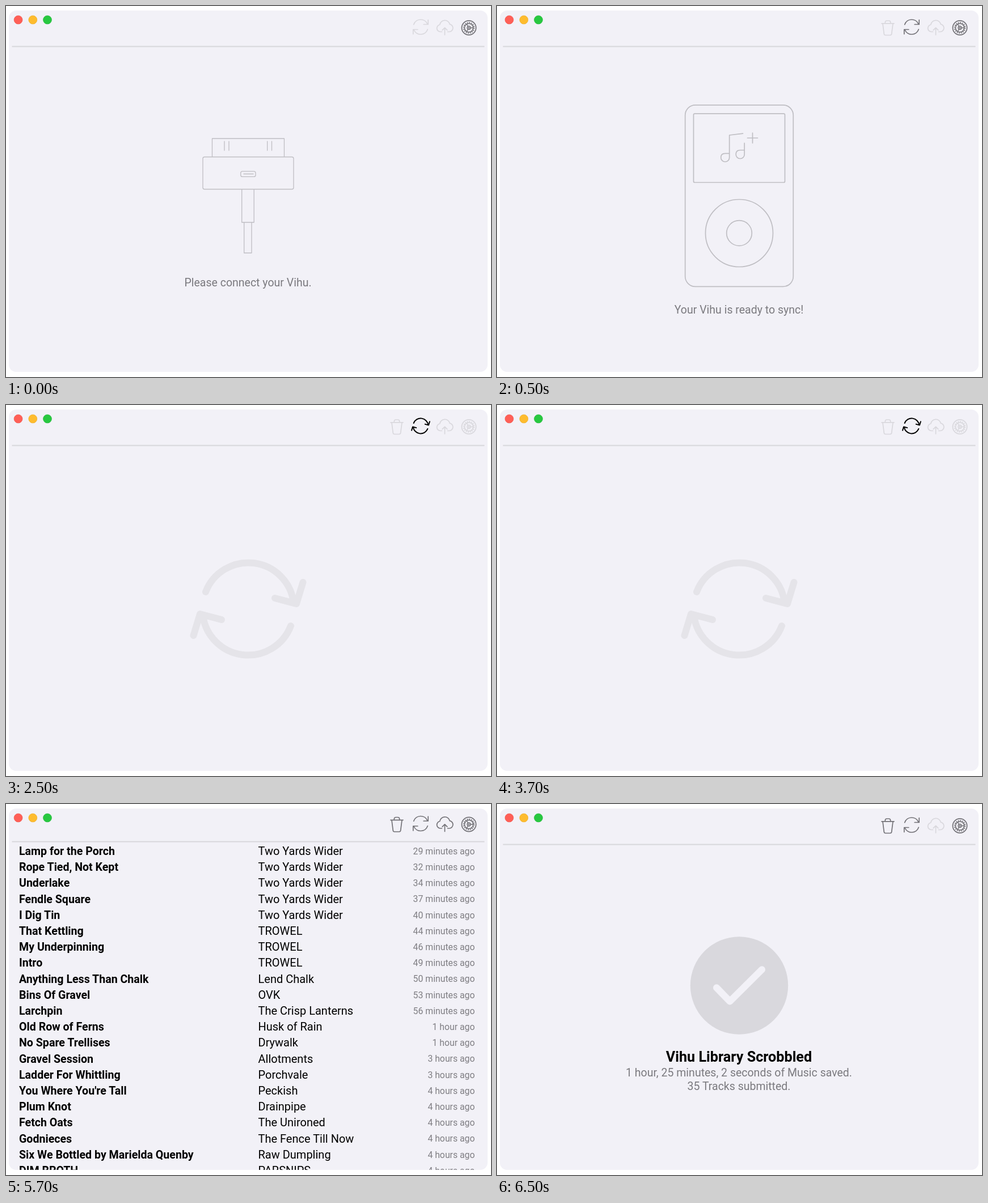
An HTML page that plays this animation: 855 px wide and 655 px high, repeating every 8000 ms.

```html
<!DOCTYPE html>
<html lang="en">
<head>
<meta charset="utf-8">
<title>Library sync</title>
<style>
  html, body { margin: 0; width: 100%; height: 100%; overflow: hidden; background: #fff; }
  svg { display: block; width: 855px; height: 655px; font-family: Roboto, Inter, sans-serif; }
  .line { fill: none; stroke: #bfbec3; stroke-linejoin: round; stroke-linecap: round; }
  .icon { fill: none; stroke-width: 1.7; stroke-linecap: round; stroke-linejoin: round; }
  .mid { text-anchor: middle; }
  .end { text-anchor: end; font-size: 15.8px; fill: #7f7e83; }
  .note { font-size: 19.5px; fill: #7b7a7f; }
  .bold { font-weight: 700; }
</style>
</head>
<body>
<svg viewBox="0 0 855 655">
  <defs>
    <clipPath id="frame"><rect x="5" y="8" width="844" height="638" rx="13"/></clipPath>
    <g id="arrows">
      <path id="arrow" d="M-75-30A80.5 80.5 0 0 1 80-11M47-19L85-9L96.5-47"/>
      <use href="#arrow" transform="rotate(180)"/>
    </g>
  </defs>
  <rect x="5" y="8" width="844" height="638" rx="13" fill="#f2f1f7"/>
  <g stroke-width=".8">
    <circle cx="21.6" cy="24.4" r="7.4" fill="#ff5f57" stroke="#f0584f"/>
    <circle cx="47.3" cy="24.4" r="7.4" fill="#febc2e" stroke="#efb02b"/>
    <circle cx="73" cy="24.4" r="7.4" fill="#28c840" stroke="#24ba3a"/>
  </g>
  <path id="rule" stroke="#d8d7dc" stroke-width="1.8"/>

  <g id="bar" class="icon">
    <path id="trash" d="M678 30.8H700M684.3 30.5V29Q684.3 26 687.3 26H690.7Q693.7 26 693.7 29V30.5M680 31L682.3 49.2Q682.6 51.5 684.9 51.5H693.1Q695.4 51.5 695.7 49.2L698 31"/>
    <g id="sync" transform="translate(731 37)">
      <path id="turn" d="M-12.3-4.2A13 13 0 0 1 12-5M13.2-12.5V-4.5H5.2"/>
      <use href="#turn" transform="rotate(180)"/>
    </g>
    <g id="busy" transform="translate(731 37) scale(.165)"><use href="#arrows" stroke-width="12"/></g>
    <path id="cloud" d="M768.5 45.5H766A6.3 6.3 0 0 1 764.8 33A8.9 8.9 0 0 1 782.3 32.2A6.7 6.7 0 0 1 781.5 45.5H778.5M773.5 51V38.5M769.2 42.6L773.5 38.3L777.8 42.6"/>
    <g id="gear" transform="translate(816 38.5)">
      <circle r="12.6"/>
      <circle r="9.2" stroke-width="2" stroke-dasharray="1.8 1.81" stroke-linecap="butt"/>
      <circle r="7.6" stroke-width="1.5"/>
      <circle r="2.9" stroke-width="1.5"/>
      <path stroke-width="1.4" d="M3 0H7.5M-1.5-2.6L-3.7-6.5M-1.5 2.6L-3.7 6.5"/>
      <circle r=".6"/>
    </g>
  </g>

  <g class="scene">
    <g class="line" stroke-width="1.3">
      <path d="M363.5 266V234H490.5V266M385 239V255M393 239V255M460.7 239V255M468.5 239V255M419 296.5H436M415.7 324V382H437.2V324M419.7 382V436H433V382"/>
      <rect x="347" y="266.5" width="160" height="57" rx="3"/>
      <rect x="413.8" y="291.8" width="26.2" height="9.6" rx="3"/>
    </g>
    <text class="note mid" x="426.5" y="495">Please connect your Vihu.</text>
  </g>

  <g class="scene">
    <g class="line" stroke-width="1.7">
      <rect x="331.7" y="174.8" width="190.6" height="320.5" rx="18"/>
      <rect x="346.5" y="190.2" width="161" height="121.3" rx="2"/>
      <circle cx="427" cy="401" r="59.5"/>
      <circle cx="427" cy="401" r="22.3"/>
      <path d="M409.7 260.3H402Q394.7 260.3 394.7 267.5A7.5 7.5 0 0 0 409.7 267.5V228L433.5 225.2M436.2 242V262A7.5 7.5 0 0 1 421.2 262Q421.2 254.5 428.5 254.5H436.2M441.5 233H459.5M450.5 224V242"/>
    </g>
    <text class="note mid" x="426.5" y="542.5">Your Vihu is ready to sync!</text>
  </g>

  <g class="scene">
    <use href="#arrows" class="icon" transform="translate(427 360)" stroke="#e5e4e9" style="stroke-width:12"/>
  </g>

  <g class="scene" id="list" clip-path="url(#frame)"></g>

  <g class="scene">
    <circle cx="427" cy="320.5" r="86.2" fill="#d9d8dd"/>
    <path class="icon" d="M387 324.3L410.5 348.5L467 292.3" stroke="#f2f1f7" style="stroke-width:12"/>
    <text class="mid bold" x="426.5" y="455" font-size="25.2">Vihu Library Scrobbled</text>
    <text class="note mid" x="426.5" y="481">1 hour, 25 minutes, 2 seconds of Music saved.</text>
    <text class="note mid" x="426.5" y="505">35 Tracks submitted.</text>
  </g>
</svg>
<script>
const $ = id => document.getElementById(id);

const tracks = `Lamp for the Porch|Two Yards Wider|29 minutes
Rope Tied, Not Kept|Two Yards Wider|32 minutes
Underlake|Two Yards Wider|34 minutes
Fendle Square|Two Yards Wider|37 minutes
I Dig Tin|Two Yards Wider|40 minutes
That Kettling|TROWEL|44 minutes
My Underpinning|TROWEL|46 minutes
Intro|TROWEL|49 minutes
Anything Less Than Chalk|Lend Chalk|50 minutes
Bins Of Gravel|OVK|53 minutes
Larchpin|The Crisp Lanterns|56 minutes
Old Row of Ferns|Husk of Rain|1 hour
No Spare Trellises|Drywalk|1 hour
Gravel Session|Allotments|3 hours
Ladder For Whittling|Porchvale|3 hours
You Where You're Tall|Peckish|4 hours
Plum Knot|Drainpipe|4 hours
Fetch Oats|The Unironed|4 hours
Godnieces|The Fence Till Now|4 hours
Six We Bottled by Marielda Quenby|Raw Dumpling|4 hours
DIM BROTH|PARSNIPS|4 hours`;

$('list').innerHTML = tracks.split('\n').map((row, i) => {
  const [song, artist, age] = row.split('|');
  const y = 90 + i * 28.2;
  return `<text class="bold" x="23" y="${y}" font-size="19.6">${song}</text>
    <text x="444.5" y="${y}" font-size="20">${artist}</text>
    <text class="end" x="826.5" y="${y - 1.3}">${age} ago</text>`;
}).join('');

const OFF = '#d9d8dd', ON = '#737277', HIDE = 'none';
const parts = ['trash', 'sync', 'busy', 'cloud', 'gear'];
const scenes = [
  { start: 0, icons: [HIDE, OFF, HIDE, OFF, ON] },
  { start: 500, icons: [OFF, ON, HIDE, OFF, ON] },
  { start: 2500, icons: [OFF, HIDE, '#000', OFF, OFF] },
  { start: 4500, icons: [ON, ON, HIDE, ON, ON], lift: 2.5 },
  { start: 6500, icons: [ON, ON, HIDE, OFF, ON] }
];
const groups = document.querySelectorAll('.scene');
let shown = -1;

function show(n) {
  const { icons, lift = 0 } = scenes[n];
  groups.forEach((g, i) => g.style.display = i === n ? '' : 'none');
  parts.forEach((id, i) => $(id).setAttribute('stroke', icons[i]));
  $('bar').setAttribute('transform', `translate(0 ${-lift})`);
  $('rule').setAttribute('d', `M10.5 ${71.5 - lift * 2}H843.5`);
  shown = n;
}

function tick(now) {
  const t = now % 8000;
  const n = scenes.findLastIndex(s => t >= s.start);
  if (n !== shown) show(n);
  requestAnimationFrame(tick);
}
show(0);
requestAnimationFrame(tick);
</script>
</body>
</html>
```
